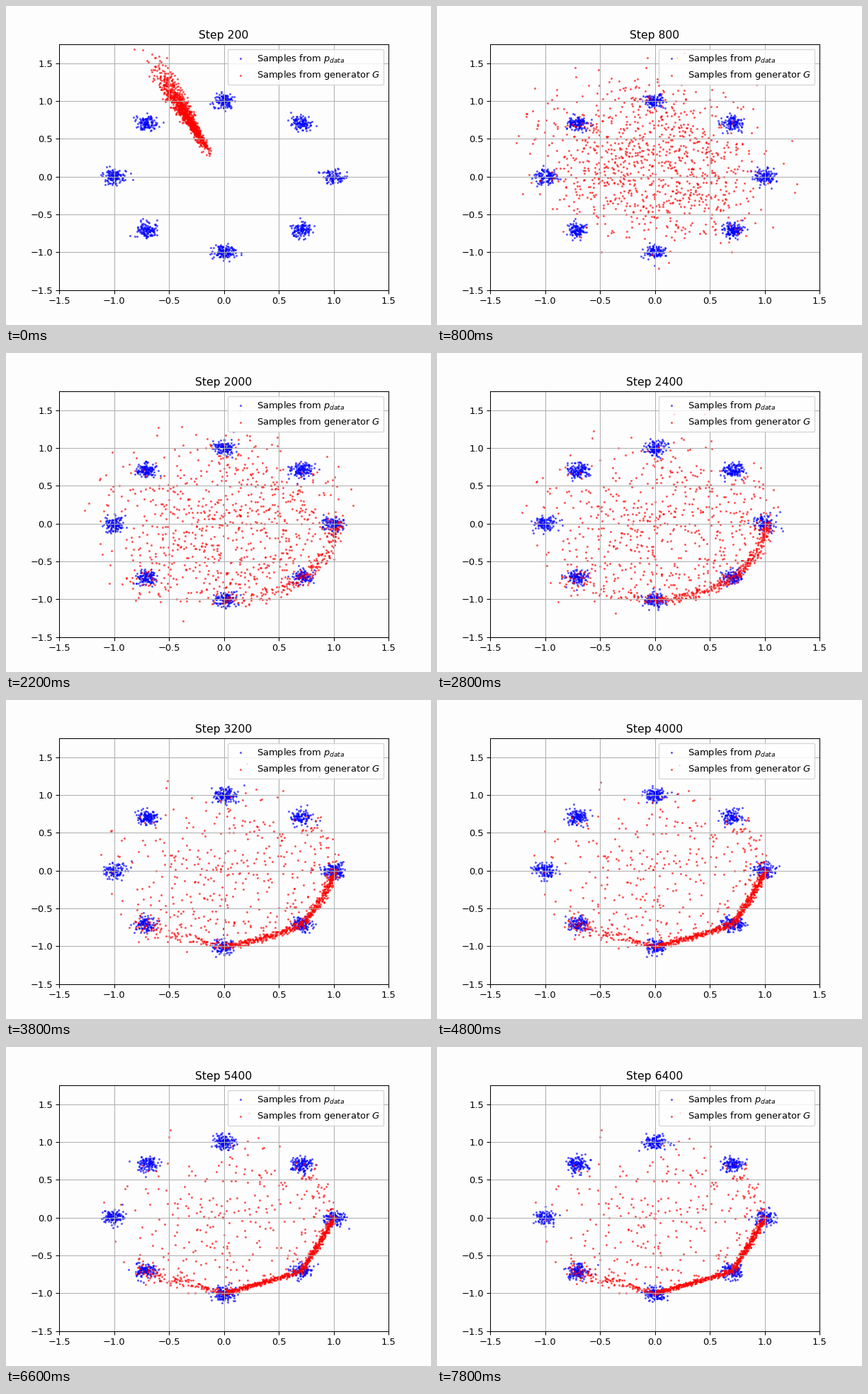
These frames come from a looping animation (600 by 450 pixels, 8000 ms). A matplotlib script:

```python
import numpy as np
import matplotlib.pyplot as plt
from matplotlib.animation import FuncAnimation

N = 1000
SLOTS, SLOT_MS = 40, 200
SPREAD_END = 6          # picture at which the cloud is fully spread
DRIFT = np.array([0.18, -0.12])
SHRINK = 0.92
CAUGHT_MAX = 0.8        # share of samples that end up on the arc

rng = np.random.default_rng(7)


def disc(n, radius):
    r = radius * np.sqrt(rng.random(n))
    a = rng.uniform(0, 2 * np.pi, n)
    return np.column_stack([r * np.cos(a), r * np.sin(a)])


# Each sample keeps its place in a soft-edged cloud for the whole loop.
cloud = disc(N, 0.95) + rng.normal(0, 0.34, (N, 2)) + [0.03, 0.05]
jitter = rng.normal(0, 1, (N, 2))


def capture_order():
    """Rank of each sample in [0, 1), low for those that reach the arc first."""
    x, y = (cloud * SHRINK + DRIFT).T
    outside = (np.hypot(x, y) > 0.9) & (x - y > -0.3)
    score = 0.1 * (x - y) + rng.normal(0, 0.5, N) + 4 * outside
    return np.argsort(np.argsort(-score)) / N


order = capture_order()

# Samples slide down-right onto the arc, so x + y decides where they land.
diagonal = cloud.sum(axis=1)
landed = np.sort(diagonal[order < CAUGHT_MAX])
arc_s = np.searchsorted(landed, diagonal) / len(landed)
arc_angle = np.radians(np.interp(arc_s, [0, 0.17, 0.94, 1], [-140, -90, 0, 45]))
fray = 1 + 2.5 * (arc_s < 0.12) + 3 * (arc_s > 0.95)


def streak():
    """The narrow band all samples start in."""
    a = (cloud[:, 1] - cloud[:, 0]) / 0.82
    y = 0.82 + 0.25 * a + 0.02 * a ** 2
    x = -0.38 - 0.42 * (y - 0.9)
    width = 0.03 + 0.012 * np.clip(a, -1, 2)
    return np.column_stack([x, y]) + jitter * np.column_stack([width, width])


start = streak()


def arc_points(settled):
    """A circle that straightens into chords between neighbouring modes."""
    half = np.pi / 8
    chord = np.cos(half) / np.cos(arc_angle % (2 * half) - half)
    r = 1.02 + (chord - 1.02) * settled ** 4
    base = np.column_stack([r * np.cos(arc_angle), r * np.sin(arc_angle)])
    thick = 0.015 + 0.055 * (1 - settled)
    return base + jitter * (thick * fray)[:, None]


def generated(p):
    if p < SPREAD_END:
        spread = 1 - (1 - p / SPREAD_END) ** 2.5
        return start + (cloud - start) * spread
    settled = 1 - np.exp(-(p - SPREAD_END) / 4)
    free = cloud * (1 - (1 - SHRINK) * settled) + DRIFT * settled
    soft = 0.05 + 0.3 * (1 - settled)
    w = np.clip((CAUGHT_MAX * settled - order) / soft, 0, 1)
    w = (1 - (1 - w) ** 3)[:, None]
    return free + (arc_points(settled) - free) * w


def real_data(p):
    r = np.random.default_rng(100 + p)
    angle = r.integers(0, 8, N) * np.pi / 4
    centers = np.column_stack([np.cos(angle), np.sin(angle)])
    return centers + r.normal(0, 0.05, (N, 2))


PAPER = "#fefdfe"
fig, ax = plt.subplots(figsize=(6.4, 4.8), dpi=93.75, facecolor=PAPER)
ax.set_facecolor(PAPER)
ax.set_xlim(-1.5, 1.5)
ax.set_ylim(-1.5, 1.75)
ax.grid(True)
blue = ax.scatter([], [], s=2, c="b", alpha=0.5, label="Samples from $p_{data}$")
red = ax.scatter([], [], s=2, c="r", alpha=0.5, label="Samples from generator $G$")
ax.legend(loc="upper right")
title = ax.set_title("Step 200")


def draw(slot):
    p = slot - (slot + 3) // 5  # every fifth slot repeats the picture before it
    blue.set_offsets(real_data(p))
    red.set_offsets(generated(p))
    title.set_text(f"Step {200 * (p + 1)}")
    return blue, red, title


anim = FuncAnimation(fig, draw, frames=SLOTS, interval=SLOT_MS,
                     repeat=True, repeat_delay=0, blit=False)
plt.show()
```
